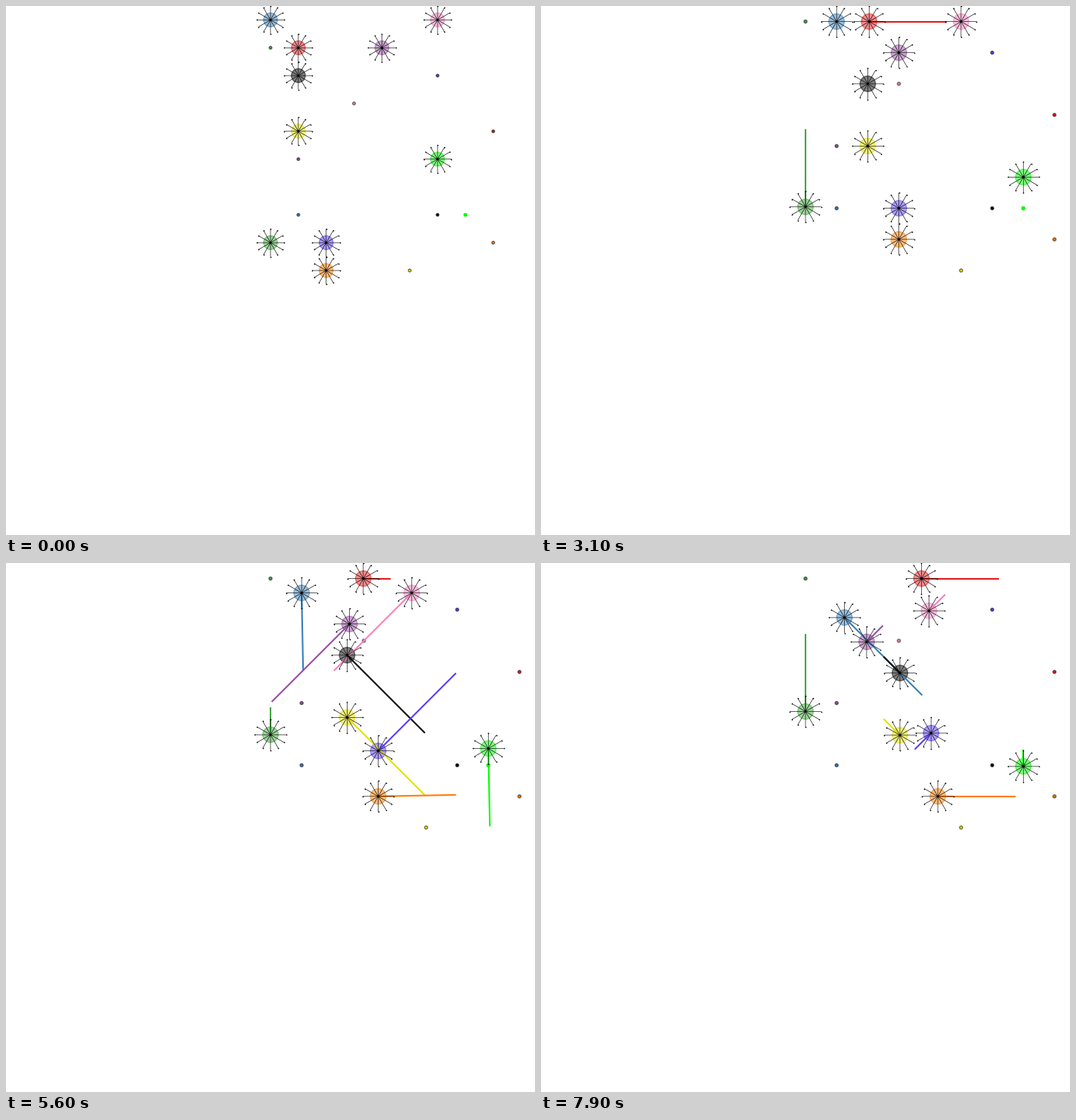
A matplotlib script that plays this animation: 700 px wide and 700 px high, repeating every 8000 ms.

```python
import numpy as np
import matplotlib.pyplot as plt
from matplotlib.animation import FuncAnimation
from matplotlib.patches import Circle

FRAMES, STEP_MS, DPI = 80, 100, 100
SPEED = .0375      # cells per frame
REACH = 2.5        # length of a full-speed heading line, per axis
GAIN = 20          # how sharply a robot brakes before a cell

# when the successive one-cell legs begin, in frames
STRAIGHT = (3.3, 29.8, 59.6)
HOLD = (3.3, 43.7)
TURN = (3.3, 43.7, 72.3)

E, N, S = (1, 0), (0, 1), (0, -1)
NE, SE, SW = (1, 1), (1, -1), (-1, -1)

# colour, start cell, goal cell, heading of each leg, leg starts
ROBOTS = [
    ("#377eb8", (0, 9), (1, 2), (SE, S, SE), TURN),
    ("#f781bf", (6, 9), (3, 6), (SW, SW), HOLD),
    ("#e41a1c", (1, 8), (8, 5), (E, E, E), STRAIGHT),
    ("#984ea3", (4, 8), (1, 4), (SW, SW), HOLD),
    ("#000000", (1, 7), (6, 2), (SE, SE), HOLD),
    ("#e2e200", (1, 5), (5, 0), (SE, SE), HOLD),
    ("#00ff00", (6, 4), (7, 2), (SE, S), HOLD),
    ("#42a83f", (0, 1), (0, 8), (N, N, N), STRAIGHT),
    ("#5a3cfa", (2, 1), (6, 7), (NE, NE), HOLD),
    ("#ff7f00", (2, 0), (8, 1), (NE, E, E), TURN),
]


def state(f, start, legs, begins):
    """Position and heading line of one robot."""
    pos, head = np.array(start, float), np.zeros(2)
    before = np.zeros(2)
    for leg, begin in zip(np.array(legs), begins):
        t = f - begin
        if t < -.5:
            break
        left = 1 - SPEED * max(t, 0)
        head = leg * REACH * np.clip(GAIN * left, 0, 1)
        if left > 0:
            # damped sideways correction after a change of heading
            sway = -.08 * np.cos(np.pi * (t - 2.3) / 10) * np.exp(-t / 25)
            head += sway * before * (leg == 0)
        elif begin == begins[-1]:
            # overshoot the last cell and creep back
            past = -left / SPEED
            over = .06 * (1 - np.exp(-past)) * np.exp(-past / 16)
            pos += leg * over
            head = -leg * REACH * 6 * over
        pos += leg * (1 - max(left, 0))
        before = leg
    return pos, head


fig = plt.figure(figsize=(7, 7), dpi=DPI, facecolor="white")
ax = fig.add_axes([0, 0, 1, 1])
ax.axis("off")

angles = np.radians(np.arange(0, 360, 30))
tips = .5 * np.column_stack([np.cos(angles), np.sin(angles)])
# centre, tip, gap for every ray
rays = np.stack([tips * 0, tips, tips * np.nan], axis=1).reshape(-1, 2)

parts = []
for color, start, goal, *_ in ROBOTS:
    edge = color if color == "#00ff00" else (0, 0, 0, .5)
    ax.add_patch(Circle(goal, .05, fc=color, ec=edge, lw=1, zorder=1))
    body = ax.add_patch(Circle(start, .25, color=color, alpha=.5, lw=1,
                               zorder=2))
    line, = ax.plot([], [], color=color, lw=1.5, zorder=3,
                    solid_capstyle="butt")
    star, = ax.plot([], [], color="black", lw=.45, zorder=4,
                    solid_capstyle="butt")
    dots = ax.scatter(*tips.T, s=1.5, c="black", lw=0, zorder=4)
    parts.append((body, line, star, dots))


def draw(f):
    top = 8
    for (_, start, _, legs, begins), part in zip(ROBOTS, parts):
        pos, head = state(f, start, legs, begins)
        body, line, star, dots = part
        body.center = pos
        line.set_data(*zip(pos, pos + head))
        star.set_data(*(rays + pos).T)
        dots.set_offsets(tips + pos)
        top = max(top, *pos)
    span = top + .5
    ax.set_xlim(-span, span)
    ax.set_ylim(-span, span)
    return [artist for part in parts for artist in part]


anim = FuncAnimation(fig, draw, frames=FRAMES, interval=STEP_MS,
                     repeat=True, repeat_delay=0, blit=False)
plt.show()
```
